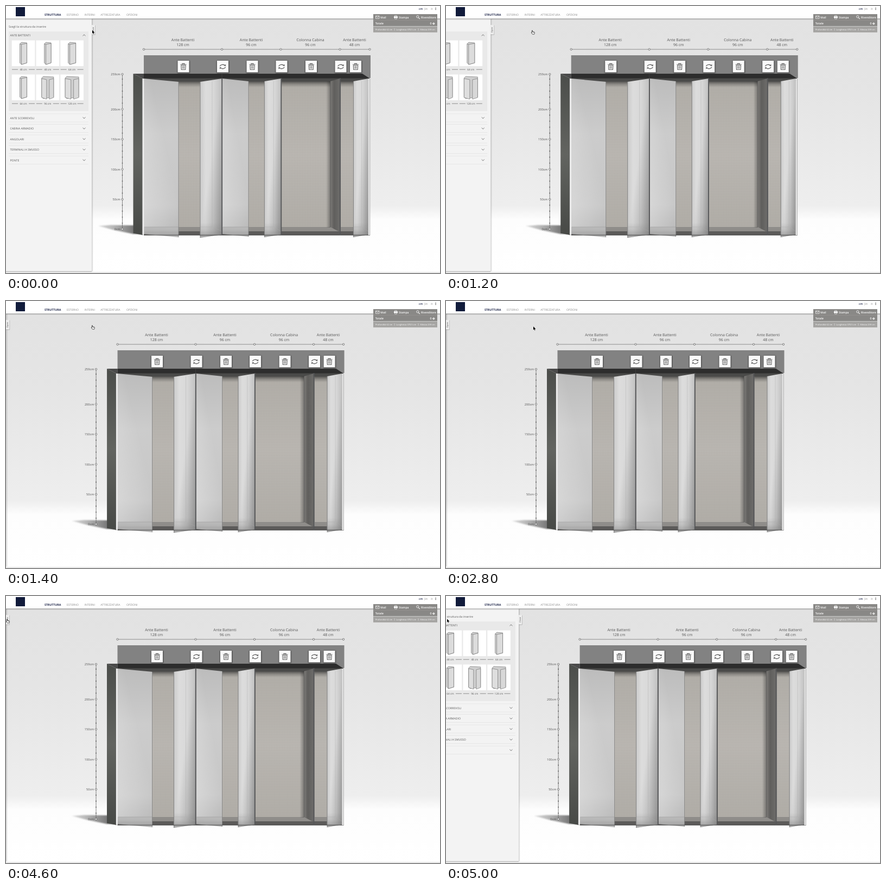
These frames come from a looping animation (800x493 px, 5.1 s). An HTML page:

```html
<!DOCTYPE html>
<html lang="it">
<head>
<meta charset="utf-8">
<title>Configuratore armadio</title>
<style>
html, body { margin: 0; width: 100%; height: 100%; overflow: hidden; background: #fff; }
svg { display: block; width: 800px; height: 493px; }
text { font-family: "Open Sans", "Noto Sans", sans-serif; text-rendering: geometricPrecision; white-space: pre; }
</style>
</head>
<body>
<svg id="stage" viewBox="0 0 800 493"></svg>
<script>
const rect = (x, y, w, h, fill, more = '') =>
  `<rect x="${x}" y="${y}" width="${w}" height="${h}" fill="${fill}" ${more}/>`;
const poly = (points, fill, more = '') => `<polygon points="${points}" fill="${fill}" ${more}/>`;
const path = (d, stroke, width = 1, more = '') =>
  `<path d="${d}" fill="none" stroke="${stroke}" stroke-width="${width}" ${more}/>`;
const dot = (x, y, r, fill, more = '') => `<circle cx="${x}" cy="${y}" r="${r}" fill="${fill}" ${more}/>`;
const text = (x, y, s, size = 5.2, fill = '#555', more = '') =>
  `<text x="${x}" y="${y}" font-size="${size}" fill="${fill}" ${more}>${s}</text>`;
const group = (id, body, more = '') => `<g id="${id}" ${more}>${body}</g>`;

const ACROSS = 'x2="1" y2="0"', DOWN = 'x2="0" y2="1"', FALLING = 'x2="1" y2="1"', RISING = 'y1="1" x2="1" y2="0"';
const gradient = (id, direction, ...stops) =>
  `<linearGradient id="${id}" ${direction}>` + stops.map(([at, color, alpha = 1]) =>
    `<stop offset="${at}" stop-color="${color}" stop-opacity="${alpha}"/>`).join('') + '</linearGradient>';
const middle = 'text-anchor="middle"';
const ring = 'stroke="#666" stroke-width=".8"';

const defs = '<defs>' +
  gradient('wall', DOWN, [0, '#e2e2e2'], [.3, '#e5e5e5'], [.6, '#ebebeb'], [.735, '#eeeeee'], [.79, '#fdfdfd'], [1, '#fff']) +
  gradient('fade', ACROSS, [0, '#000', .2], [1, '#000', 0]) +
  gradient('drop', DOWN, [0, '#000', .3], [1, '#000', 0]) +
  gradient('side', DOWN, [0, '#4b4d4a'], [.5, '#626460'], [1, '#474946']) +
  gradient('back', DOWN, [0, '#b2afa9'], [.5, '#bcb9b4'], [1, '#b2afa9']) +
  gradient('topShade', DOWN, [0, '#222', .65], [.5, '#222', .25], [1, '#222', 0]) +
  gradient('rightShade', ACROSS, [0, '#222', 0], [1, '#222', .4]) +
  gradient('inner', ACROSS, [0, '#7c7a77'], [.4, '#5f5e5c'], [1, '#6d6c6a']) +
  gradient('leftDoor', DOWN, [0, '#bfbfbf', .97], [.35, '#cecece', .98], [.8, '#cacaca', .97], [.95, '#bababa', .95], [1, '#acacac', .88]) +
  gradient('glow', RISING, [0, '#fff', .32], [.6, '#fff', 0]) +
  gradient('rightDoor', ACROSS, [0, '#cecece', .97], [.25, '#e0e0e0', .97], [.6, '#dcdcdc', .97], [1, '#c4c4c4', .97]) +
  gradient('dusk', FALLING, [.5, '#000', 0], [1, '#000', .26]) +
  gradient('doorFoot', DOWN, [0, '#777', 0], [.5, '#777', .2], [1, '#777', .55]) +
  gradient('cast', ACROSS, [0, '#555', .2], [.5, '#444', .5], [1, '#333', .8]) +
  '<pattern id="weave" width="3" height="3" patternUnits="userSpaceOnUse">' +
  path('M0 .5H3M.5 0V3', '#96928b', .4, 'opacity=".4"') + '</pattern>' +
  '<filter id="soft" x="-20%" y="-60%" width="140%" height="220%"><feGaussianBlur stdDeviation="1.3"/></filter>' +
  '</defs>';

// Wardrobe
function bay(left, right, from, to) {
  const w = to - from;
  return rect(left, 133, right - left, 290, '#62615f') +
    rect(from, 139, w, 270, 'url(#back)') + rect(from, 139, w, 270, 'url(#weave)') +
    rect(from, 139, w, 11, 'url(#topShade)') +
    rect(left, 133, right - left, 6.5, '#4a4a49') +
    poly(`${left},408 ${to},408 ${right},417 ${left},417`, '#8f8d8a') +
    rect(left, 416, right - left, 7, '#5c5b5a');
}
function leftDoor(a, b, drop) {
  const low = 421 + drop;
  const shape = `${a},134 ${b},${134 + drop} ${b},${low} ${a},421`;
  return poly(shape, 'url(#leftDoor)') + poly(`${a},134 ${b},${134 + drop} ${b},408 ${a},408`, 'url(#glow)') +
    path(`M${a + 1} 408H${b}`, '#8d8d8d', .6, 'opacity=".7"') +
    path(`M${b} ${134 + drop}V${low}`, '#858585', .9);
}
function rightDoor(a, b, drop) {
  const shape = `${a},${134 + drop} ${b},134 ${b},422 ${a},${422 + drop}`;
  const inset = b - (b - a) * .45;
  return poly(shape, 'url(#rightDoor)') + poly(shape, 'url(#dusk)') +
    poly(`${a},400 ${b},400 ${b},422 ${a},${422 + drop}`, 'url(#doorFoot)') +
    path(`M${inset} 139V408L${b} 416M${inset} 408H${a}`, '#aaa', .6, 'opacity=".7"') +
    path(`M${a} ${134 + drop}V${422 + drop}`, '#858585', 1.1);
}
const button = (x, icon) =>
  rect(x - 11, 101, 22.5, 23, '#000', 'opacity=".5" filter="url(#soft)"') + rect(x - 10.5, 101, 21, 21.5, '#fafafa') +
  `<g transform="translate(${x} 112)">${icon}</g>`;
const trash =
  path('M-5.5 -4H5.5M-2 -4.3V-5.6H2V-4.3', '#666', 1.2) +
  path('M-4.2 -2.3H4.2L3.7 5.5H-3.7Z', '#666', 1.1) + path('M-1.7 -1V4M0 -1V4M1.7 -1V4', '#666', .8);
const turn =
  path('M-5.2 -.8A5.4 4 0 0 1 4 -2.4M5.2 .8A5.4 4 0 0 1 -4 2.4', '#666', 1.3) +
  poly('5.6,-4.4 5.6,-.9 2.1,-1.4', '#666') + poly('-5.6,4.4 -5.6,.9 -2.1,1.4', '#666');

const joints = [254, 398, 506.5, 615.5, 670.5];
const bays = [[326, 'Ante Battenti', 128], [452, 'Ante Battenti', 96], [561, 'Colonna Cabina', 96], [642.5, 'Ante Battenti', 48]];
const heights = [[259, 126], [200, 190.5], [150, 246], [100, 301.5], [50, 357], [0, 412]];

function scene() {
  let s = poly('170,406 192,404.5 237,405 252,421 235,421 200,414', 'url(#cast)', 'filter="url(#soft)"');
  s += rect(254, 91, 418, 42, '#828282');
  s += poly('234.5,125 252.5,134 252.5,423 234.5,419.5', 'url(#side)');
  s += bay(254, 398, 316, 360) + bay(398, 507, 445, 478) + bay(507, 616, 508, 598) + bay(616, 670, 617, 642);
  s += rect(590, 139, 8, 270, 'url(#rightShade)');
  s += poly('598,139 615,134 615,417 598,408', 'url(#inner)') + path('M598 139V408', '#555', .7);
  s += poly('234.5,125 254,125 254,134 252.5,134', '#4a4a4a') + poly('254,125 657,125 670,133.5 254,133.5', '#2d2d2d');
  s += path('M398 125V133', '#444', .7);
  s += leftDoor(254, 318, 6) + rightDoor(358, 398, 6) + leftDoor(399, 447, 5) + rightDoor(476.5, 507, 5) + rightDoor(640.5, 668, 5);
  s += path('M254 423.2H671', '#222', 1.3, 'opacity=".6"');
  s += path('M398.2 133V423M507.3 133V423M616 133V423', '#555658', 1.8);
  s += rect(251.3, 134, 3, 288.5, '#eeeeee') + path('M251 134V423', '#666', .6);
  s += rect(667.8, 134, 2.8, 289, '#e6e6e6') + path('M670.8 134V423', '#8a8a8a', .6);
  s += path('M254 80H670.5', '#777', .8) + joints.map(x => dot(x, 80, 1.7, '#eee', ring)).join('');
  for (const [x, name, width] of bays)
    s += text(x, 64.5, name, 6.95, '#555', middle) + text(x, 74, width + ' cm', 6.95, '#555', middle);
  s += path('M214.5 126V412', '#666', .8);
  for (let y = 412; y > 128; y -= 11.08) s += dot(214.5, y, .9, '#555');
  for (const [cm, y] of heights)
    s += dot(214.5, y, 1.7, '#eee', ring) + text(210.8, y + 2, cm + 'cm', 5.6, '#555', 'text-anchor="end"');
  s += [327, 454, 562.5, 644.5].map(x => button(x, trash)).join('');
  s += [399.5, 508, 617].map(x => button(x, turn)).join('');
  return s;
}

// Side panel
const chevron = (y, dir) => path(`M141.5 ${y - dir}L144 ${y + dir}L146.5 ${y - dir}`, '#555', .8);
function cabinet(x, y, w, double) {
  const edge = 'stroke="#666" stroke-width=".6" stroke-linejoin="round"';
  const l = x - w / 2, r = x + w / 2;
  let s = poly(`${l},${y + 3} ${l + 3},${y} ${r},${y + 1} ${r},${y + 38} ${l + 3},${y + 41} ${l},${y + 38}`, '#cfcfcf', edge);
  if (double) {
    s += poly(`${l},${y + 4} ${x - 2},${y + 6} ${x - 2},${y + 42} ${l},${y + 39}`, '#dedede', edge);
    s += poly(`${x + 3},${y + 6} ${r},${y + 4} ${r},${y + 39} ${x + 3},${y + 42}`, '#d8d8d8', edge);
  } else {
    s += poly(`${l + 3},${y + 4} ${r},${y + 2} ${r},${y + 38} ${l + 3},${y + 41}`, '#dcdcdc', edge);
    s += path(`M${l} ${y + 3}L${l + 3} ${y + 4}`, '#666', .6);
  }
  return s;
}
function panel() {
  let s = rect(158, 24, 3, 466, 'url(#fade)') + rect(0, 23, 158, 467, '#f3f3f3') + rect(0, 489.7, 158, 1, '#aaa');
  s += text(5, 40, 'Scegli la struttura da inserire');
  s += rect(5, 47, 147, 147, '#e9e9e9') + text(7.5, 56, 'ANTE BATTENTI') + chevron(54, -1.2);
  [[48, 13], [48, 12.5], [64, 14], [64, 13], [96, 22], [128, 25]].forEach(([cm, w], i) => {
    const x = 32 + i % 3 * 44.8, y = i < 3 ? 63.5 : 126.5;
    s += rect(x - 21.3, y, 42.6, 47.5, '#fff') + cabinet(x, y + 3.5, w, cm > 64);
    s += text(x, y + 55.3, cm + ' cm', 4.7, '#555', middle);
    s += path(`M${x - 21} ${y + 53.7}h11M${x + 10} ${y + 53.7}h11`, '#777', .8);
  });
  ['ANTE SCORREVOLI', 'CABINA ARMADIO', 'ANGOLARI', 'TERMINALI A SMUSSO', 'PONTE'].forEach((name, i) => {
    const y = 206.5 + i * 19.5;
    s += text(7.5, y + 2, name) + chevron(y, 1.2) + path(`M5 ${y - 7.5}H152M5 ${y + 7.5}H152`, '#dedede', .6);
  });
  s += rect(158, 35.5, 7, 18, '#000', 'rx="1" opacity=".2"') + rect(157, 35, 7.2, 17.5, '#ededed');
  s += `<text id="tab" transform="translate(162 44) rotate(-90)" font-size="4" fill="#555" ${middle}></text>`;
  return s;
}

// Page header
function header() {
  let s = rect(0, 23, 800, 3, 'url(#drop)') + rect(0, 0, 800, 23, '#fff') + rect(18, 2, 17, 17, '#111b3b');
  s += text(71, 17.7, 'STRUTTURA', 5.2, '#1a2145', 'font-weight="700"');
  for (const [x, name] of [[111.7, 'ESTERNO'], [144.5, 'INTERNI'], [174.3, 'ATTREZZATURA'], [222, 'OPZIONI']])
    s += text(x, 17.7, name, 5.1, '#888');
  s += text(761, 7, 'cm', 5, '#1a2145', 'font-weight="600"') + text(770, 7, '|in', 5, '#777') + text(783.3, 7, 'it', 5, '#777');
  s += path('M792 3.2V7M791 4.2L792 3L793 4.2M791 6L792 7.2L793 6', '#555', .6);
  s += rect(677, 15, 118, 22.3, '#898886') + path('M677 26.2H795', '#9c9b99', .6) + rect(677, 38, 118, 10.7, '#a5a4a2');
  const bold = 'font-weight="600"';
  s += text(690.3, 22.6, 'Mail', 5, '#fff', bold) + text(724, 22.6, 'Stampa', 5, '#fff', bold);
  s += text(765, 22.6, 'Rivenditore', 5, '#fff', bold) + text(680.8, 33.7, 'Totale', 5.2, '#fff', bold);
  s += text(791, 33.7, '0 \uFFFD', 5.2, '#fff', bold + ' text-anchor="end"');
  s += path('M681.5 18.3H688V23.2H681.5ZM681.5 18.3L684.8 21.3L688 18.3', '#fff', .7);
  s += path('M716.5 19.5V17.8H720.5V19.5M716.5 21.5V23.8H720.5V21.5', '#fff', .7) + rect(715, 19.3, 7, 2.7, '#fff');
  s += dot(758.8, 19.8, 2.1, 'none', 'stroke="#fff" stroke-width=".8"') + path('M760.3 21.3L762.8 23.8', '#fff', 1.1);
  s += text(681, 44.9, 'Profondità 62 cm', 3.95, '#fff') + text(719, 44.9, 'Lunghezza 370.5 cm', 3.95, '#fff');
  s += text(763.3, 44.9, 'Altezza 259 cm', 3.95, '#fff') + path('M716 41.5V45.5M760 41.5V45.5', '#fff', .5);
  return s;
}

const arrow = '<path d="M0 0V6.4L1.5 5.1L2.5 7.4L3.4 7L2.5 4.8H4.5Z" fill="#000" stroke="#fff" stroke-width=".5" paint-order="stroke"/>';
const hand = '<path d="M-.6 .8Q0 0 .6 .8V3L4 3.7Q4.6 4.2 4.2 6L3.7 7.6H.4L-2 4.7Q-1.8 3.8 -.6 4.8Z" fill="#fff" stroke="#111" stroke-width=".7"/>' +
  path('M1.7 3.4V5M2.9 3.7V5', '#111', .4);

const $ = id => document.getElementById(id);
$('stage').innerHTML = defs + rect(0, 23, 800, 470, 'url(#wall)') + group('scene', scene()) +
  rect(0, 491.5, 800, .8, '#c8c8c8') + group('panel', panel()) + header() +
  group('cursor', group('arrow', arrow) + group('hand', hand));

const LOOP = 5100, STEP = 100;
const clamp = p => Math.min(1, Math.max(0, p));
const swing = p => .5 - Math.cos(Math.PI * clamp(p)) / 2;

// The CSS "ease" curve, solved by bisection
function ease(p) {
  let lo = 0, hi = 1, u = .5;
  for (let i = 0; i < 20; i++) {
    u = (lo + hi) / 2;
    if (.75 * u * (1 - u) + u ** 3 < p) lo = u; else hi = u;
  }
  return .3 * u * (1 - u) ** 2 + 3 * u * u * (1 - u) + u ** 3;
}

function pointer(t) {
  if (t < 2500) return [159, 44.5];
  const cross = swing((t - 3300) / 600), settle = clamp((t - 3900) / 200);
  return [161 - 153 * cross - 6 * settle, 47 - 4 * cross - .8 * settle];
}

function draw(now) {
  const t = Math.floor(now % LOOP / STEP) * STEP;
  const shut = ease(clamp((t - 1115) / 300)) - ease(clamp((t - 4835) / 300));
  $('panel').setAttribute('transform', `translate(${-158 * shut} 0)`);
  $('scene').setAttribute('transform', `translate(${-48.5 * shut} 0)`);
  $('tab').textContent = t > 1115 && t < 4835 ? 'Open' : 'Close';
  $('cursor').setAttribute('transform', `translate(${pointer(t)})`);
  const pointing = t >= 700 && t < 2200 || t >= 4500 && t < 4800;
  $('hand').setAttribute('visibility', pointing ? 'visible' : 'hidden');
  $('arrow').setAttribute('visibility', pointing ? 'hidden' : 'visible');
}

const start = performance.now();
(function tick() {
  draw(performance.now() - start);
  requestAnimationFrame(tick);
})();
</script>
</body>
</html>
```
